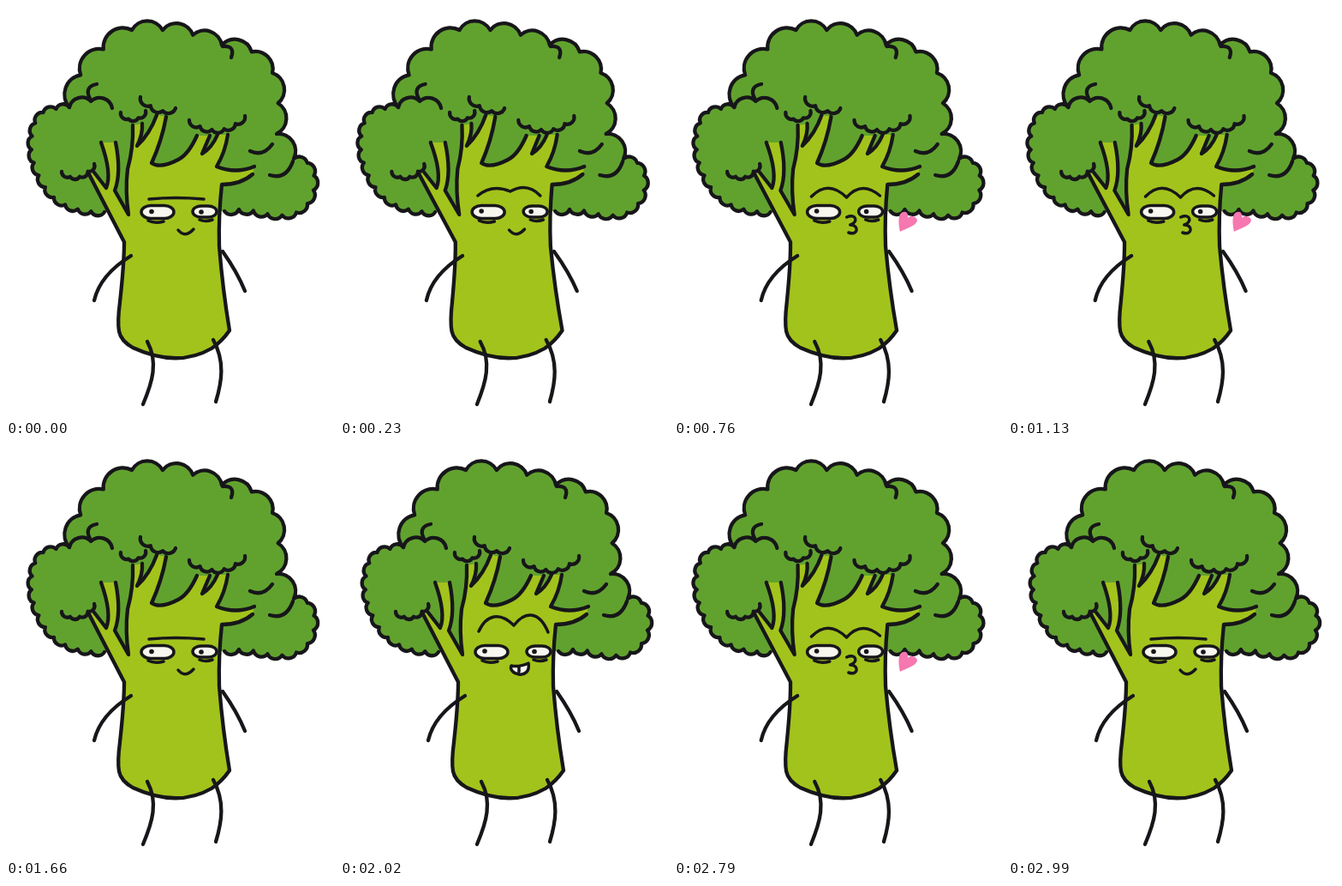
Recreate the animation shown at these times as an HTML page. Size 383 by 480 pixels, loop 3320 ms.

```html
<!DOCTYPE html>
<html lang="en">
<head>
<meta charset="utf-8">
<title>Broccoli kiss</title>
<style>
html, body { margin: 0; width: 100%; height: 100%; overflow: hidden; background: #fff; }
svg { display: block; width: 100%; height: 100%; }
.line { fill: none; stroke: #17161a; stroke-width: 4.3; stroke-linecap: round; stroke-linejoin: round; }
.thin { stroke-width: 3.5; }
.white { fill: #f8f7ef; }
.pupil { fill: #17161a; stroke: none; }
</style>
</head>
<body>
<svg viewBox="0 0 383 480">
  <g id="body">
    <path id="crown" class="line" style="fill:#61a22f"/>
    <path id="flesh" fill="#a2c31c"/>
    <g class="line">
      <path id="edges"/>
      <path id="clumps"/>
      <path d="M106 91Q91 94 98 108M253 47Q268 46 263 60M285 169Q300 176 311 161M308 197Q327 203 335 181"/>
      <path d="M146 291Q110 313 103 343M253 286Q270 310 279 332"/>
      <path d="M165 391C178 415 171 438 160 464M242 389C256 414 252 438 245 461"/>
    </g>
    <g class="line thin">
      <rect class="white" x="158" y="232.500" width="38" height="15" rx="11" ry="7.500"/>
      <rect class="white" x="218" y="233" width="28" height="13" rx="10" ry="6.500"/>
      <path d="M166 250Q174 254 184 251M226 249Q233 252 241 249"/>
      <g id="pupils" class="pupil"><circle cx="170" cy="239.500" r="2.800"/><circle cx="228" cy="240" r="2.800"/></g>
      <path id="brow"/>
      <path id="mouth"/>
    </g>
  </g>
  <path id="heart" fill="#f777b0" d="M264 263C262 253 261 241 268 240C272 239 274 243 273 247C277 243 284 246 284 250C283 256 271 259 264 263Z"/>
</svg>
<script>
const $ = id => document.getElementById(id);
const set = (id, d) => $(id).setAttribute('d', d);

// Round bumps, n of equal length, along a guide curve.
function scallop(guide, n, sweep) {
  const path = document.createElementNS('http://www.w3.org/2000/svg', 'path');
  path.setAttribute('d', guide);
  const step = path.getTotalLength() / n, r = 0.57 * step;
  let d = '';
  for (let i = 0; i <= n; i++) {
    const { x, y } = path.getPointAtLength(i * step);
    d += i ? `A${r} ${r} 0 0 ${sweep} ${x} ${y}` : `M${x} ${y}`;
  }
  return d;
}

// Left lobe, left slope, top, notch and right lobe, clockwise.
set('crown', [
  ['M115 240C80 240 55 230 43 206Q28 180 30 158Q32 126 50 121L74 118', 13],
  ['M74 118Q80 65 147 28', 3],
  ['M147 28C185 25 225 32 255 47Q303 50 311 78Q322 115 316 149', 7],
  ['M316 149L336 178', 1],
  ['M336 178C362 175 370 215 345 238Q325 248 300 241T255 239', 10]
].map(([guide, n]) => scallop(guide, n, 1)).join('').replace(/(?!^)M/g, 'L'));

set('clumps', [
  ['M65 193Q85 210 103 184', 4],
  ['M134 124Q148 142 163 122', 3],
  ['M157 106Q180 130 198 119', 3],
  ['M214 133Q250 158 279 128', 5]
].map(([guide, n]) => scallop(guide, n, 0)).join('') + scallop('M74 118L99 111L124 119', 2, 1));

// "~" marks branch ends: filled across, but not outlined.
const trunk = `M97 196L138 275Q138 300 133 345Q130 368 132 379Q134 390 148 398
  Q200 422 240 399Q252 391 261 378Q253 330 249 280Q248 245 252 208Q274 208 288 196
  ~290 187Q268 196 246 187Q256 170 259 150 ~247 150Q240 166 229 172L238 151
  ~223 151Q213 173 201 179Q180 190 170 183Q182 157 187 129
  ~176 127Q168 149 153 163Q160 149 159 137
  ~148 139Q149 165 142 190Q139 215 143 243L127 215Q135 194 128 159
  ~111 159Q124 195 117 212L103 194`;
set('flesh', trunk.replaceAll('~', 'L'));
set('edges', trunk.replaceAll('~', 'M'));

const smile = 'M201 261Q209 271 219 260';
const faces = {
  calm: ['M167 225Q198 222 231 225', smile],
  wake: ['M165 221Q182 207 203 216Q223 205 238 221', smile],
  grin: ['M162 216C171 196 187 193 203 209C217 191 233 193 243 217',
    'M200 256Q209 258 220 253C222 263 215 267 209 266C202 265 198 260 200 256ZM209 258V263'],
  kiss: ['M163 222Q183 202 204 223Q222 203 243 221',
    'M204 246C215 241 218 252 208 255C219 255 217 268 206 264']
};

// start ms, lean, face, heart shown
const poses = [
  [0, 0, 'calm'],
  [230, 0.017, 'wake'],
  [360, 0, 'grin'],
  [560, 0.0105, 'kiss'],
  [630, 0, 'kiss'],
  [760, 0.0105, 'kiss', true],
  [960, 0, 'kiss', true],
  [1130, 0.0105, 'kiss', true],
  [1200, 0.005, 'wake'],
  [1330, 0, 'calm']
];

function draw() {
  const t = performance.now() % 1660;
  const [, lean, face, heart] = poses.findLast(p => p[0] <= t);
  const [brow, mouth] = faces[face];
  // The feet stay put while everything above leans left.
  $('body').setAttribute('transform', `matrix(1 0 ${lean} 1 ${-465 * lean} 0)`);
  set('brow', brow);
  set('mouth', mouth);
  $('mouth').setAttribute('class', face === 'grin' ? 'white' : '');
  $('heart').style.display = heart ? '' : 'none';
  $('pupils').setAttribute('transform', face === 'calm' ? '' : 'translate(-1 -.5)');
  requestAnimationFrame(draw);
}
draw();
</script>
</body>
</html>
```
